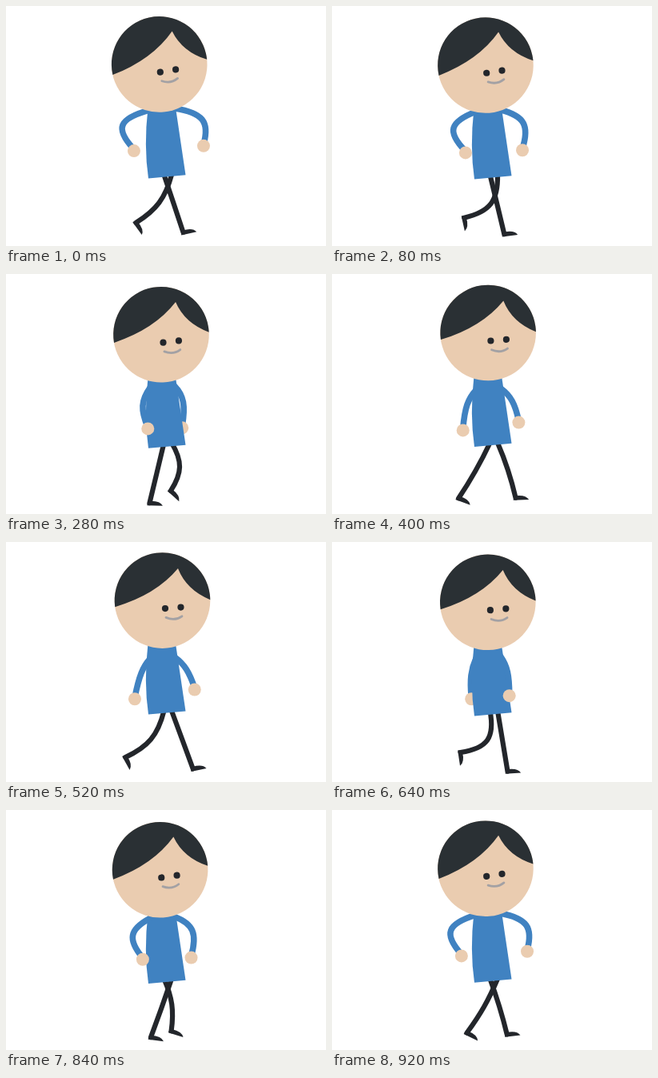
These frames come from a looping animation (400 px wide and 300 px high, 0.96 s). An HTML page with a canvas:

```html
<!DOCTYPE html>
<html lang="en">
<head>
<meta charset="utf-8">
<title>Walk cycle</title>
<style>
  html, body { margin: 0; width: 100%; height: 100%; overflow: hidden; background: #fff; }
  canvas { display: block; width: 400px; height: 300px; }
</style>
</head>
<body>
<canvas id="stage" width="400" height="300"></canvas>
<script>
const ctx = document.getElementById('stage').getContext('2d');
// A full stride is 25 steps; the loop cuts back to the start after 24.
const STEP_MS = 40, LOOP = 24, STRIDE = 25;
const W = 2 * Math.PI / STRIDE, DEG = Math.PI / 180;
const SKIN = '#eaccb0', HAIR = '#2a3034', SHIRT = '#4082c1', DARK = '#23262b', LIP = '#a3a1a4';

function dot(x, y, r, color) {
  ctx.fillStyle = color;
  ctx.beginPath();
  ctx.arc(x, y, r, 0, 2 * Math.PI);
  ctx.fill();
}

// Runs draw in a moved and turned coordinate system
function placed(x, y, angle, draw) {
  ctx.save();
  ctx.translate(x, y);
  ctx.rotate(angle * DEG);
  draw();
  ctx.restore();
}

// A soft curve from (x0, y0) to (x1, y1), drawn towards the joint (jx, jy)
function limb(x0, y0, jx, jy, x1, y1, width, color) {
  const pull = (a, b) => a + (b - a) * 0.75;
  ctx.strokeStyle = color;
  ctx.lineWidth = width;
  ctx.beginPath();
  ctx.moveTo(x0, y0);
  ctx.bezierCurveTo(pull(x0, jx), pull(y0, jy), pull(x1, jx), pull(y1, jy), x1, y1);
  ctx.stroke();
}

// p counts steps since this leg was furthest forward
function leg(hipX, reachX, p) {
  const hipY = 211;
  const near = (peak, sharpness) => (0.5 + 0.5 * Math.cos(W * (p - peak))) ** sharpness;
  const swing = -12.5 + 36 * Math.cos(W * p) - 2 * Math.sin(2 * W * p);
  const x = reachX + swing;
  const y = 287 - 24 * near(16, 2) - 0.006 * Math.max(0, swing) ** 2;
  const bend = 33 * near(16.3, 3.4);
  const footAngle = 82 * near(15.7, 2.5) - 14 * near(-1, 4);

  const dx = x - hipX, dy = y - hipY, len = Math.hypot(dx, dy);
  const kneeX = hipX + dx / 2 + bend * dy / len;
  const kneeY = hipY + dy / 2 - bend * dx / len;
  limb(hipX, hipY, kneeX, kneeY, x, y, 6.2, DARK);

  placed(x, y, footAngle, () => {
    ctx.fillStyle = DARK;
    ctx.beginPath();
    ctx.moveTo(-3, 3);
    ctx.lineTo(16.5, 3);
    ctx.quadraticCurveTo(13, -3.5, 0, -2.5);
    ctx.quadraticCurveTo(-3, -2, -3, 3);
    ctx.fill();
  });
}

function arm(x, y, elbowX, elbowY, handX, handY) {
  limb(x, y, elbowX, elbowY, handX, handY - 2, 7.6, SHIRT);
  dot(handX, handY, 8, SKIN);
}

function shirt(dy) {
  ctx.fillStyle = SHIRT;
  ctx.beginPath();
  ctx.moveTo(177.5, 127 + dy);
  ctx.lineTo(212, 127 + dy);
  ctx.lineTo(224.5, 211.3 + dy);
  ctx.lineTo(178, 215.5 + dy);
  ctx.quadraticCurveTo(172, 175 + dy, 177.5, 127 + dy);
  ctx.fill();
}

function head(x, y, tilt) {
  const R = 59.8;
  placed(x, y, tilt, () => {
    const a = Math.PI - 0.135, b = -0.015;
    dot(0, 0, R, SKIN);
    ctx.fillStyle = HAIR;
    ctx.beginPath();
    ctx.arc(0, 0, R, a, b);
    ctx.quadraticCurveTo(30, -13, 19.5, -40);
    ctx.quadraticCurveTo(-8, -7, R * Math.cos(a), R * Math.sin(a));
    ctx.fill();
  });
  // The face slides sideways a little as the head turns
  placed(x + tilt * 0.65, y, tilt, () => {
    dot(3.5, 10, 4.1, DARK);
    dot(23, 8.5, 4.1, DARK);
    ctx.strokeStyle = LIP;
    ctx.lineWidth = 2.8;
    ctx.beginPath();
    ctx.moveTo(4.5, 21.3);
    ctx.quadraticCurveTo(15.5, 26, 24.5, 19.7);
    ctx.stroke();
  });
}

function draw(step) {
  // Sway repeats once per stride, beat once per footfall
  const sway = Math.cos(W * step), beat = Math.cos(2 * W * (step + 0.6));
  const wave = (mean, s, b) => mean + s * sway + b * beat;
  const bob = wave(1.5, 0, -1.65);
  const drop = bob + wave(8, -8, 0);

  const leftArm = () => arm(180, 130 + drop,
    wave(155, -20, -8), wave(157, -7, -6), wave(169.5, 0, -10), wave(190.5, -7.5, -2));
  const rightArm = () => arm(211, 128 + drop,
    wave(235, 15, 8), wave(150, -10, -5), wave(230.5, 5, 12), wave(186, -4.5, -7));
  const [back, front] = sway > -0.42 ? [rightArm, leftArm] : [leftArm, rightArm];

  ctx.fillStyle = '#fff';
  ctx.fillRect(0, 0, 400, 300);
  ctx.lineCap = 'round';
  leg(207, 211, step + STRIDE / 2);
  leg(197.5, 198, step);
  back();
  shirt(bob * 0.85);
  front();
  head(wave(193.6, -1.9, 0), 73 + bob, wave(-2.5, -2.5, 0));
}

function frame() {
  draw(Math.floor(performance.now() / STEP_MS) % LOOP);
  requestAnimationFrame(frame);
}
frame();
</script>
</body>
</html>
```
